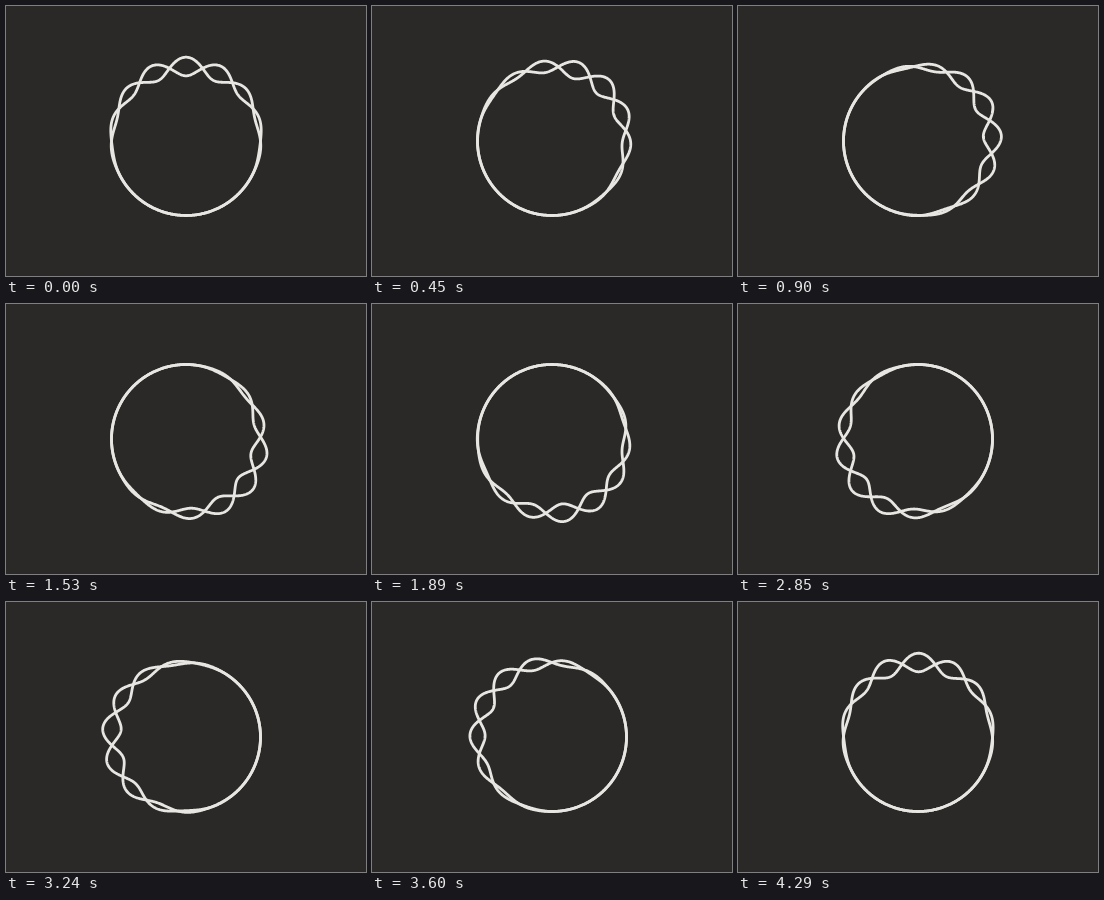
Write an HTML page with a canvas that moves like this. It is 360 by 270 pixels and loops after 4320 ms.

```html
<!DOCTYPE html>
<html lang="en">
<head>
<meta charset="utf-8">
<title>Braided ring</title>
<style>
  html, body { margin: 0; height: 100%; overflow: hidden; background: #2a2928; }
  canvas { display: block; }
</style>
</head>
<body>
<canvas id="stage" width="360" height="270"></canvas>
<script>
const ctx = document.getElementById('stage').getContext('2d');
const LOOP = 4320, STEP = 30;
const RADIUS = 74.5, SWING = 9.3, WAVES = 7;
const TAU = 2 * Math.PI, POINTS = 720;

// Angles run clockwise from the top of the ring.
function strand(sign, p) {
  ctx.beginPath();
  for (let i = 0; i < POINTS; i++) {
    const a = i / POINTS * TAU;
    const envelope = Math.cos((a - p * TAU) / 2) ** 6;
    const wave = Math.cos(WAVES * a + 3 * Math.PI * p);
    const r = RADIUS + sign * SWING * envelope * wave;
    ctx.lineTo(180 + r * Math.sin(a), 135 - r * Math.cos(a));
  }
  ctx.closePath();
  ctx.stroke();
}

function draw() {
  const t = Math.floor(performance.now() % LOOP / STEP) * STEP;
  ctx.fillStyle = '#2a2928';
  ctx.fillRect(0, 0, 360, 270);
  ctx.strokeStyle = '#e8e6e2';
  ctx.lineWidth = 2.8;
  ctx.lineJoin = 'round';
  strand(1, t / LOOP);
  strand(-1, t / LOOP);
  requestAnimationFrame(draw);
}
draw();
</script>
</body>
</html>
```
